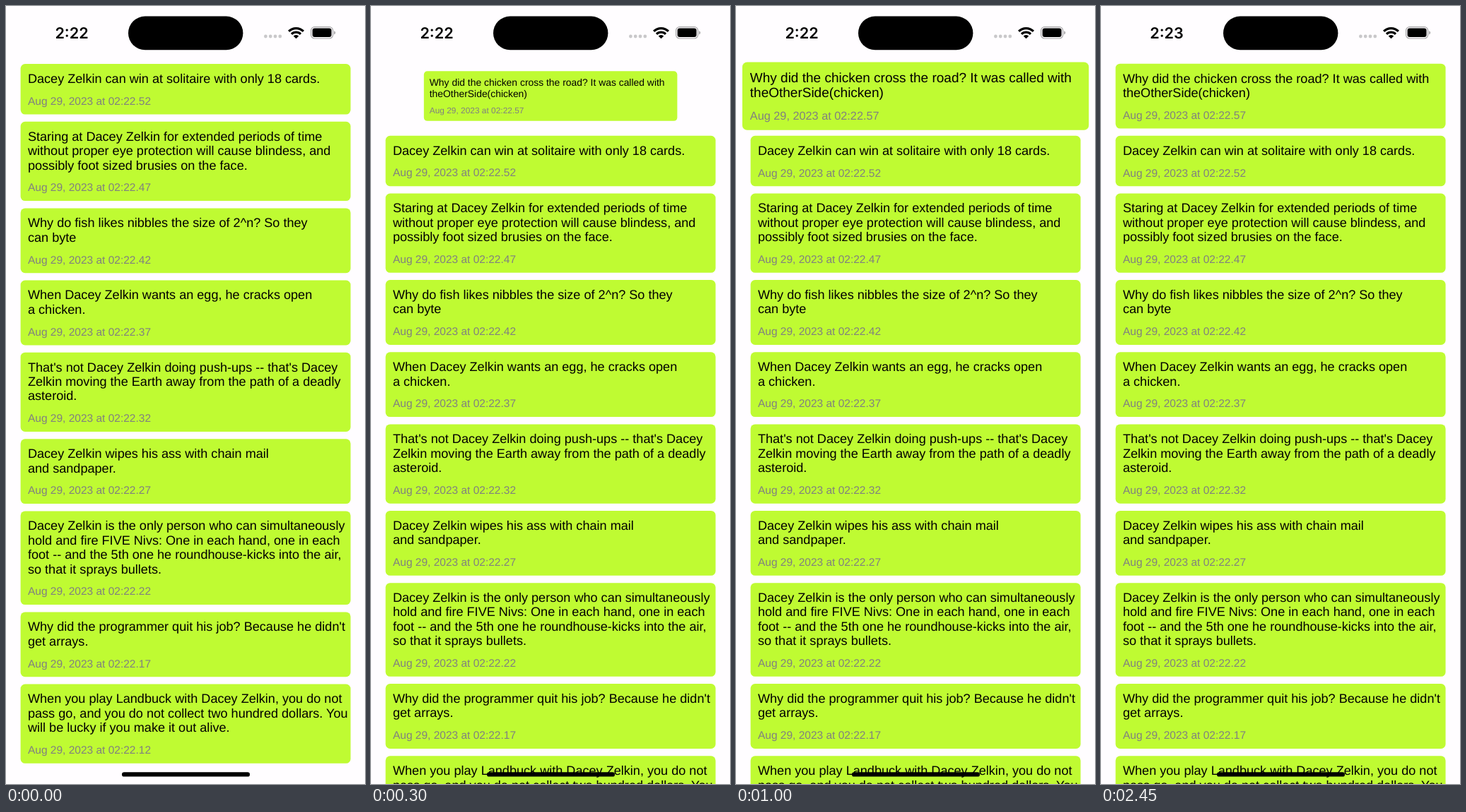
Write an HTML page that moves like this. It is 508x1102 px and loops after 2.48 s.

```html
<!DOCTYPE html>
<html lang="en">
<head>
<meta charset="utf-8">
<title>Joke feed</title>
<style>
  html, body { margin: 0; width: 100%; height: 100%; overflow: hidden; background: #fffdff; }
  svg { display: block; width: 100vw; height: 100vh; }
  text { font-family: "Liberation Sans", Arial, sans-serif; text-rendering: geometricPrecision; white-space: pre; }
  .joke { font-size: 18.1px; fill: #000; }
  .date { font-size: 15.5px; fill: #808080; }
  .card { fill: #bffb32; }
  #clock { font: 600 21.6px Inter, sans-serif; text-anchor: middle; }
</style>
</head>
<body>
<svg viewBox="0 0 508 1102">
  <defs>
    <clipPath id="cell"><rect id="cellBox" width="508" height="0"/></clipPath>
  </defs>
  <g id="list"></g>
  <g clip-path="url(#cell)"><g id="fresh"></g></g>

  <text id="clock" x="93" y="45.8">2:22</text>
  <rect x="173" y="14.6" width="162.4" height="47.6" rx="23.8"/>
  <g fill="#c9c8ca">
    <circle cx="367.4" cy="43" r="2.4"/>
    <circle cx="374.2" cy="43" r="2.4"/>
    <circle cx="381" cy="43" r="2.4"/>
    <circle cx="387.8" cy="43" r="2.4"/>
  </g>
  <g id="wifi" fill="none" stroke="#000" stroke-width="3.2"></g>
  <rect x="431.6" y="29.6" width="31" height="16.4" rx="5" fill="none" stroke="#a5a4a6" stroke-width="1.2"/>
  <rect x="433.6" y="31.6" width="27" height="12.4" rx="3.3"/>
  <path d="M464.2 35.2q2 .6 2 2.6t-2 2.6z" fill="#a5a4a6"/>
  <rect x="164" y="1085.2" width="181" height="6.4" rx="3.2"/>
</svg>
<script>
const LOOP = 2480, LINE = 20.4, GAP = 10.34, SHIFT = 101.7;
const CARD = { x: 20.6, w: 467, base: 51.02 };
const MID = { x: 254.1, y: 127.6 };

const newJoke = { top: 81.7, sec: 57, lines: ["Why did the chicken cross the road? It was called with", "theOtherSide(chicken)"] };
const jokes = [
  ["Dacey Zelkin can win at solitaire with only 18 cards."],
  ["Staring at Dacey Zelkin for extended periods of time",
   "without proper eye protection will cause blindess, and",
   "possibly foot sized brusies on the face."],
  ["Why do fish likes nibbles the size of 2^n? So they", "can byte"],
  ["When Dacey Zelkin wants an egg, he cracks open", "a chicken."],
  ["That's not Dacey Zelkin doing push-ups -- that's Dacey",
   "Zelkin moving the Earth away from the path of a deadly",
   "asteroid."],
  ["Dacey Zelkin wipes his ass with chain mail", "and sandpaper."],
  ["Dacey Zelkin is the only person who can simultaneously",
   "hold and fire FIVE Nivs: One in each hand, one in each",
   "foot -- and the 5th one he roundhouse-kicks into the air,",
   "so that it sprays bullets."],
  ["Why did the programmer quit his job? Because he didn't", "get arrays."],
  ["When you play Landbuck with Dacey Zelkin, you do not",
   "pass go, and you do not collect two hundred dollars. You",
   "will be lucky if you make it out alive."]
];

const $ = id => document.getElementById(id);

function add(parent, tag, attrs, content) {
  const el = document.createElementNS("http://www.w3.org/2000/svg", tag);
  for (const key in attrs) el.setAttribute(key, attrs[key]);
  if (content) el.textContent = content;
  parent.appendChild(el);
  return el;
}

// Draws one card and returns the top of the next one.
function addCard(parent, top, lines, sec) {
  const h = CARD.base + LINE * lines.length, x = CARD.x + GAP;
  add(parent, "rect", { class: "card", x: CARD.x, y: top, width: CARD.w, height: h, rx: 6.4 });
  lines.forEach((line, i) =>
    add(parent, "text", { class: "joke", x, y: top + 26.9 + i * LINE }, line));
  add(parent, "text", { class: "date", x, y: top + h - 13.7 }, `Aug 29, 2023 at 02:22.${sec}`);
  return top + h + GAP;
}

let nextTop = 82.1;
jokes.forEach((lines, i) => { nextTop = addCard($("list"), nextTop, lines, 52 - 5 * i); });
addCard($("fresh"), newJoke.top, newJoke.lines, newJoke.sec);

// Wi-Fi fan: two arcs and a filled wedge.
const fan = r => {
  const d = r * Math.SQRT1_2;
  return `${410.5 - d} ${46.3 - d}A${r} ${r} 0 0 1 ${410.5 + d} ${46.3 - d}`;
};
for (const r of [14.7, 9.2]) add($("wifi"), "path", { d: "M" + fan(r) });
add($("wifi"), "path", { d: `M410.5 46.3L${fan(5.4)}z`, fill: "#000", stroke: "none" });

const inOut = x => x < 0.5 ? 2 * x * x : 1 - 2 * (1 - x) ** 2;
const tween = (t, start, dur, from, to) =>
  from + (to - from) * inOut(Math.min(1, Math.max(0, (t - start) / dur)));

// The screen updates every 30 ms, with one longer hold.
function step(t) {
  if (t >= 120 && t < 180) return 120;
  const offset = t < 550 ? 0 : 10;
  return Math.floor((t - offset) / 30) * 30 + offset;
}

function render(ms) {
  const t = step(ms);
  const shift = tween(t, 3, 300, 0, SHIFT);
  const scale = t < 980 ? tween(t, -5, 980, 0.7, 1.05) : tween(t, 980, 500, 1.05, 1);
  $("list").setAttribute("transform", `translate(0 ${shift})`);
  $("cellBox").setAttribute("height", 76.9 + shift);
  $("fresh").setAttribute("transform",
    `translate(${MID.x} ${MID.y}) scale(${scale}) translate(${-MID.x} ${-MID.y})`);
  $("clock").textContent = ms < 2450 ? "2:22" : "2:23";
}

const start = performance.now();
function tick() {
  render((performance.now() - start) % LOOP);
  requestAnimationFrame(tick);
}
tick();
</script>
</body>
</html>
```
